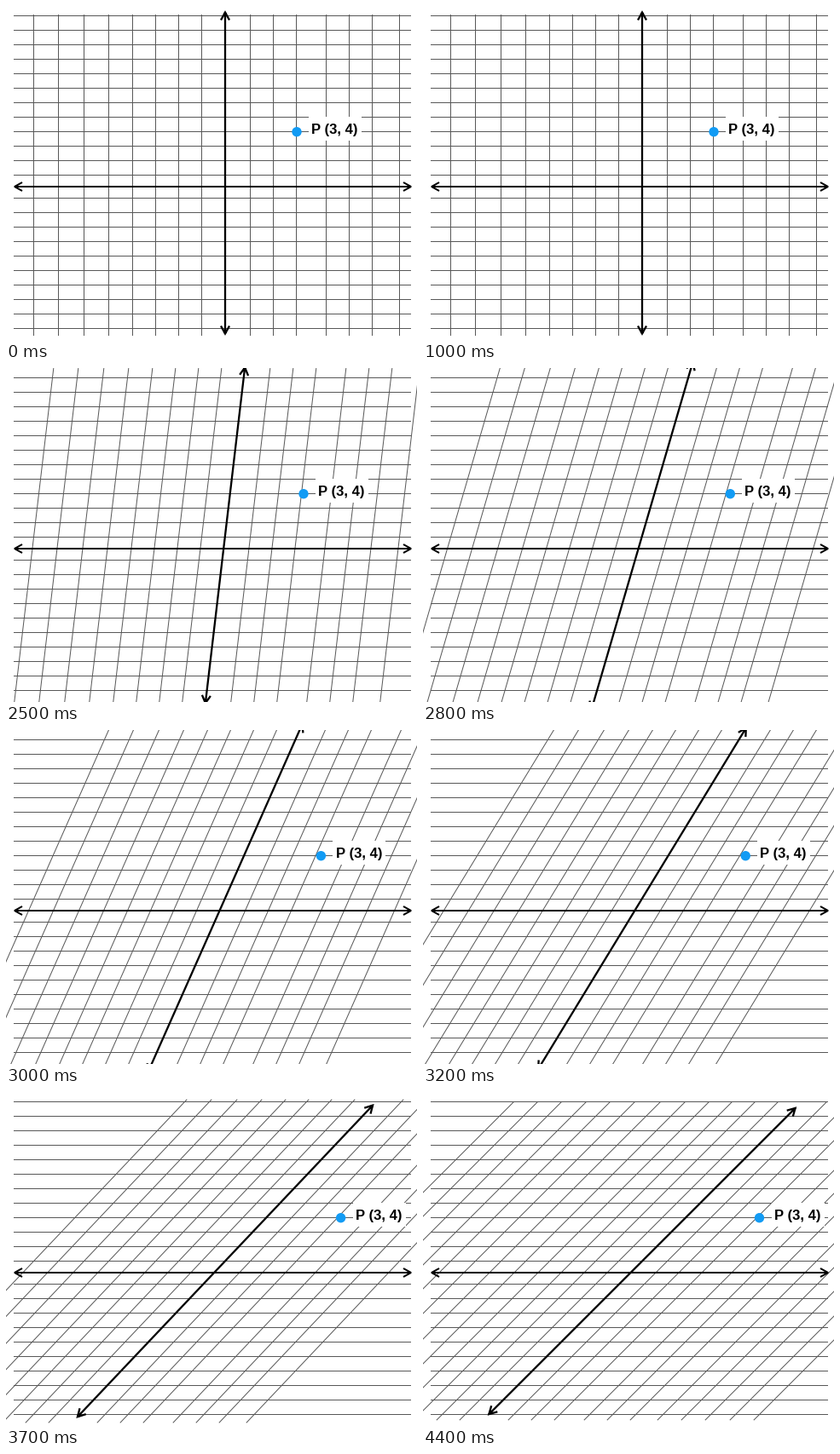
These frames come from a looping animation (482x392 px, 4500 ms). A matplotlib script:

```python
import numpy as np
import matplotlib.pyplot as plt
from matplotlib.animation import FuncAnimation
from matplotlib.patches import Circle, Rectangle

W, H, DPI = 482, 392, 64
PT = 72 / DPI                      # points per pixel
STEP, FRAMES = 100, 45             # ms per frame, frames per loop
START, DURATION = 1964, 2000       # timing of the shear, ms
CENTER = np.array([257.0, 198.5])  # pivot of the leaning lines
AXIS_LEN = (377, 508)
GRID_LEN = (377, 528)
DOT_X = (341, 394.5)
GRID_COLOR = "#585858"

COLS = np.array([32, 61, 91, 120, 148, 175, 202, 229,
                 286, 313, 340, 375, 402, 429, 461])
EXTRA = np.array([-81, -53, -25, 4, 489, 517, 546, 574])
ROWS = np.r_[11:199:17, 225:379:17]

plt.rcParams["font.family"] = "Liberation Sans"
fig = plt.figure(figsize=(W / DPI, H / DPI), dpi=DPI, facecolor="white")
ax = fig.add_axes([0, 0, 1, 1])
ax.set_xlim(0, W)
ax.set_ylim(H, 0)
ax.axis("off")


def line(width, color="black", z=1):
    # Snapping would push half-pixel centres to the next pixel.
    return ax.plot([], [], color=color, lw=width * PT, zorder=z, snap=False,
                   solid_capstyle="butt", solid_joinstyle="miter")[0]


def segments(starts, ends):
    """Join many segments into one path with gaps."""
    gap = np.full_like(starts, np.nan)
    return np.stack([starts, ends, gap], axis=1).reshape(-1, 2).T


def arrow(a, b, head=9, half=5):
    """Shaft from a to b with an open head at both ends."""
    u = (b - a) / np.hypot(*(b - a))
    n = np.array([-u[1], u[0]])
    gap = np.full(2, np.nan)
    parts = [a, b, gap]
    for tip, d in ((a, u), (b, -u)):
        back = tip + head * d
        parts += [back + half * n, tip, back - half * n, gap]
    return np.array(parts).T


def ease(t):
    """Ease-in-out, cubic-bezier(.42, 0, .58, 1)."""
    s = np.linspace(0, 1, 400)
    x = 1.26 * s * (1 - s) ** 2 + 1.74 * s ** 2 * (1 - s) + s ** 3
    return np.interp(t, x, 3 * s ** 2 - 2 * s ** 3)


def mix(pair, p):
    return pair[0] + (pair[1] - pair[0]) * p


def half_vector(angle, length):
    return np.array([np.sin(angle), -np.cos(angle)]) * length / 2


y = ROWS + 0.5
rows = line(1, GRID_COLOR)
rows.set_data(segments(np.c_[np.full_like(y, 9), y],
                       np.c_[np.full_like(y, 475), y]))
cols = line(1, GRID_COLOR)
x_axis = line(2, z=3)
x_axis.set_data(arrow(np.array([10.0, 212]), np.array([475.0, 212])))
y_axis = line(2.3, z=3)

box = ax.add_patch(Rectangle((0, 130), 62, 28, color="white", lw=0, zorder=2))
dot = ax.add_patch(Circle((0, 147.7), 5.7, color="#129bf4", lw=0, zorder=4))
label = ax.text(0, 150, "P (3, 4)", fontsize=16.6 * PT, weight="bold",
                va="baseline", zorder=5)


def draw(i):
    t = (i * STEP - START) / DURATION
    p = ease(np.clip(t, 0, 1))
    angle = p * np.pi / 4

    xs = np.r_[COLS, EXTRA] if t >= 1 else COLS
    mid = np.c_[xs + 0.5, np.full(len(xs), CENTER[1])]
    v = half_vector(angle, mix(GRID_LEN, p))
    cols.set_data(segments(mid + v, mid - v))

    v = half_vector(angle, mix(AXIS_LEN, p))
    shift = np.array([0, -2.5 * (1 - p)])
    y_axis.set_data(arrow(CENTER + shift + v, CENTER + shift - v))

    x = mix(DOT_X, p)
    dot.center = (x, 147.7)
    box.set_x(x + 14)
    label.set_x(x + 17.1)
    return cols, y_axis, dot, box, label


anim = FuncAnimation(fig, draw, frames=FRAMES, interval=STEP,
                     repeat=True, repeat_delay=0)
plt.show()
```
